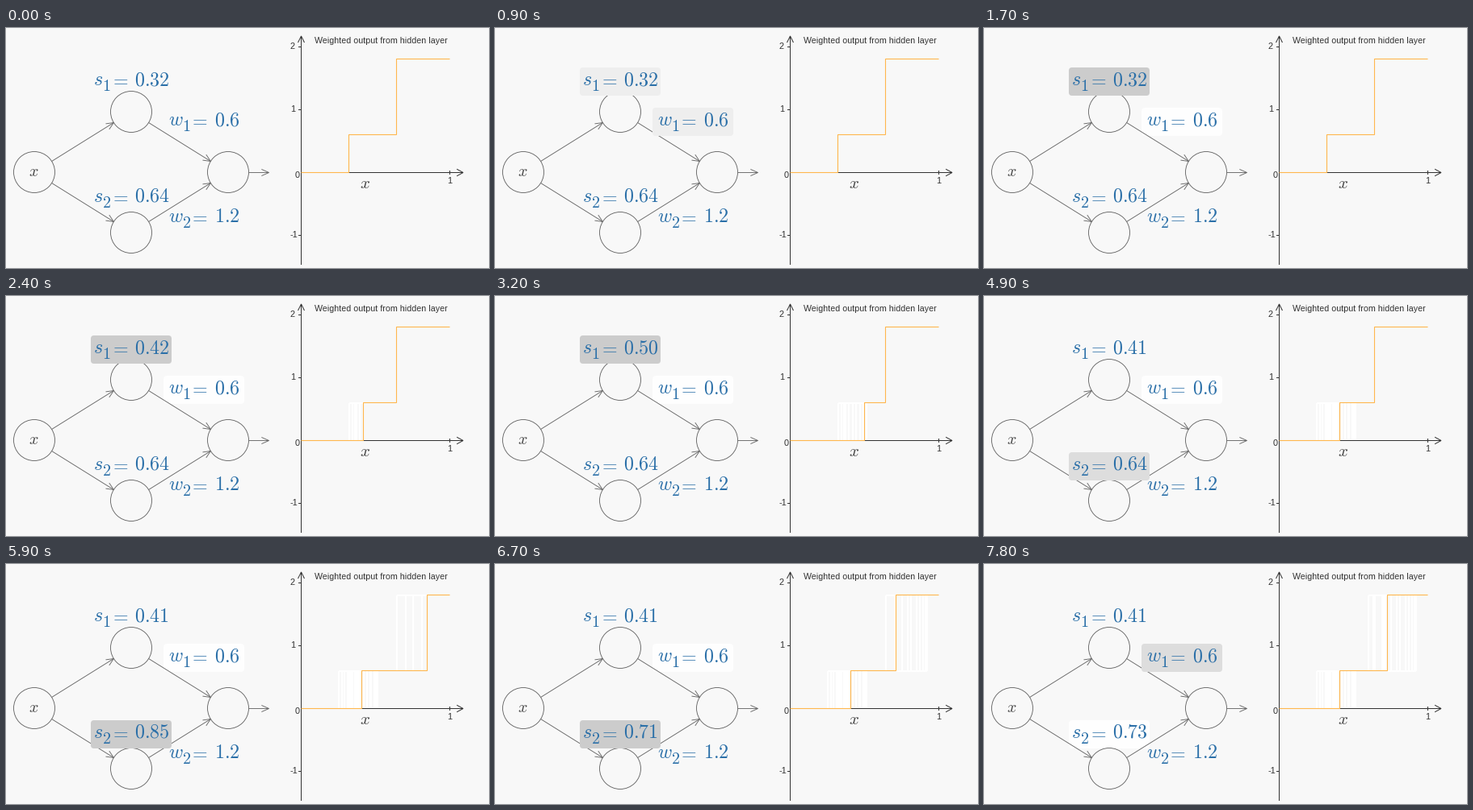
A matplotlib script that plays this animation: 598 px wide and 298 px high, repeating every 8000 ms.

```python
import numpy as np
import matplotlib.pyplot as plt
from matplotlib.animation import FuncAnimation
from matplotlib.collections import LineCollection
from matplotlib.patches import Circle, FancyBboxPatch

WIDTH, HEIGHT, DPI = 598, 298, 64
FRAMES, INTERVAL = 80, 100
PAPER, RESIDUE = "#f8f8f8", "#fefefe"
INK, WIRE, BLUE, ORANGE = "#333333", "#666666", "#2a6fa8", "#ffb74d"
X0, Y0, X_UNIT, Y_UNIT = 365.5, 179.5, 184, 78.2
W1, W2 = 0.6, 1.2
RADIUS = 25.5

# (frame, value) keys of the two dragged step positions
S1_KEYS = [(19, .32), (23, .39), (27, .49), (28, .49), (29, .51), (31, .51),
           (32, .50), (36, .33), (40, .25), (42, .25), (45, .38), (46, .41)]
S2_KEYS = [(55, .64), (58, .81), (59, .85), (60, .89), (61, .92), (63, .92),
           (64, .91), (65, .87), (66, .79), (67, .71), (68, .64), (69, .60),
           (71, .60), (72, .63), (73, .69), (74, .73)]

# Highlight colour of each label from the given frame on
SHADES = {
    "s1": {9: "#eeeeee", 10: "#dddddd", 17: "#cccccc", 49: None},
    "s2": {49: "#dddddd", 55: "#cccccc", 77: "#eeeeee", 78: RESIDUE},
    "w1": {8: "#dddddd", 9: "#eeeeee", 10: RESIDUE, 77: "#eeeeee", 78: "#dddddd"},
}

plt.rcParams["mathtext.fontset"] = "cm"
fig = plt.figure(figsize=(WIDTH / DPI, HEIGHT / DPI), dpi=DPI, facecolor=PAPER)
ax = fig.add_axes([0, 0, 1, 1])
ax.set(xlim=(0, WIDTH), ylim=(HEIGHT, 0))
ax.axis("off")


def px(size):
    return size * 72 / DPI


# Graph coordinates land on pixel centres, which keeps the lines crisp.
def plot_x(value):
    return np.floor(X0 + value * X_UNIT) + 0.5


def plot_y(value):
    return np.floor(Y0 - value * Y_UNIT) + 0.5


def line(xs, ys, color=INK, width=1.0, z=2):
    return ax.plot(xs, ys, color=color, lw=px(width), zorder=z, snap=False,
                   solid_capstyle="butt", solid_joinstyle="miter")[0]


def arrow(start, end, color=WIRE, head=10, spread=0.42, width=0.9):
    (xa, ya), (xb, yb) = start, end
    line([xa, xb], [ya, yb], color, width)
    angle = np.arctan2(yb - ya, xb - xa)
    sides = angle + np.pi + np.array([-spread, spread])
    hx, hy = xb + head * np.cos(sides), yb + head * np.sin(sides)
    line([hx[0], xb, hx[1]], [hy[0], yb, hy[1]], color, width)


def connect(a, b):
    """Arrow from the rim of node a to the rim of node b."""
    a, b = np.array(a), np.array(b)
    rim = RADIUS * (b - a) / np.hypot(*(b - a))
    arrow(a + rim, b - rim)


def math(x, y, body, size=24, color=BLUE, ha="left"):
    return ax.text(x, y, f"${body}$", fontsize=px(size), color=color, ha=ha,
                   va="baseline", zorder=6)


def label(x, y, body, ha="center", size=11):
    ax.text(x, y, body, fontsize=px(size), family="Liberation Sans",
            color=INK, ha=ha, va="baseline", zorder=6)


def parameter(x, y, letter, index, value, advance):
    """Write letter_index = value and return the artist of the value."""
    math(x, y, letter)
    math(x + advance, y + 7, index, 20)
    # mathtext pads the equals sign on its left
    math(x + advance + 8.3, y, "=")
    return math(x + advance + 40, y, value)


def highlight(x, y):
    box = FancyBboxPatch((x, y), 100, 35, lw=0, visible=False,
                         boxstyle="round,pad=0,rounding_size=4")
    return ax.add_patch(box)


# Network
source, upper, lower, sink = (35, 179), (155, 104), (155, 254), (275, 179)
for center in (source, upper, lower, sink):
    ax.add_patch(Circle(center, RADIUS, fill=False, ec=WIRE, lw=px(0.9), zorder=2))
for hidden in (upper, lower):
    connect(source, hidden)
    connect(hidden, sink)
arrow((301, 179.5), (325.5, 179.5))
math(34.5, 183.5, "x", 20, "#444444", "center")

values = {"s1": parameter(108, 71, "s", 1, "0.32", 11.3),
          "s2": parameter(108, 216, "s", 2, "0.64", 11.3)}
parameter(201, 121, "w", 1, W1, 17)
parameter(201, 241, "w", 2, W2, 17)
boxes = {"s1": highlight(105, 49), "s2": highlight(105, 194),
         "w1": highlight(195, 99)}

# Graph
arrow((X0, 294), (X0, 10), INK, 9, 0.46, 1)
arrow((X0, Y0), (566, Y0), INK, 9, 0.5, 1)
for tick in (-1, 1, 2):
    line([362, 366], [plot_y(tick)] * 2)
line([plot_x(1)] * 2, [177, 182])
label(464.7, 19, "Weighted output from hidden layer", size=10.6)
label(357.5, 26, "2", "right")
label(358.5, 104, "1", "right")
label(364, 186, "0", "right")
label(361.5, 260, "-1", "right")
label(549.5, 193, "1")
math(445, 199, "x", 21, "#444444", "center")

trails = ax.add_collection(
    LineCollection([], colors="white", linewidths=px(2.2), zorder=1))
step = line([], [], ORANGE, 1.1, 4)


def value_at(keys, frame):
    times, points = zip(*keys)
    return np.round(np.interp(frame, times, points) + 1e-9, 2)


def trail_segments(past1, past2):
    """Pale remains of every place the step line has left."""
    low, mid, high = plot_y(0) - 1, plot_y(W1), plot_y(W1 + W2)
    x1, x2 = plot_x(past1), plot_x(past2)
    segments = [[(x, low), (x, mid)] for x in np.unique(x1[x1 != x1[-1]])]
    segments += [[(x, mid), (x, high)] for x in np.unique(x2[x2 != x2[-1]])]
    spans = [(x1.min(), x1[-1], mid), (x2.min(), x2[-1], high),
             (x2[-1], x2.max(), mid)]
    return segments + [[(a, y), (b, y)] for a, b, y in spans if b > a]


def shade_at(name, frame):
    shade = None
    for start, color in SHADES[name].items():
        if frame >= start:
            shade = color
    return shade


def update(frame):
    past = np.arange(frame + 1)
    past1, past2 = value_at(S1_KEYS, past), value_at(S2_KEYS, past)
    s1, s2 = past1[-1], past2[-1]
    values["s1"].set_text(f"${s1:.2f}$")
    values["s2"].set_text(f"${s2:.2f}$")

    for name, box in boxes.items():
        shade = shade_at(name, frame)
        box.set_visible(shade is not None)
        if shade:
            box.set_facecolor(shade)
            box.set_zorder(0 if shade == RESIDUE else 5)

    x1, x2 = plot_x(s1), plot_x(s2)
    mid, high = plot_y(W1), plot_y(W1 + W2)
    step.set_data([X0, x1, x1, x2, x2, plot_x(1)],
                  [Y0, Y0, mid, mid, high, high])
    trails.set_segments(trail_segments(past1, past2))
    return [*values.values(), *boxes.values(), step, trails]


anim = FuncAnimation(fig, update, frames=FRAMES, interval=INTERVAL,
                     repeat=True, repeat_delay=0, blit=False)
plt.show()
```
